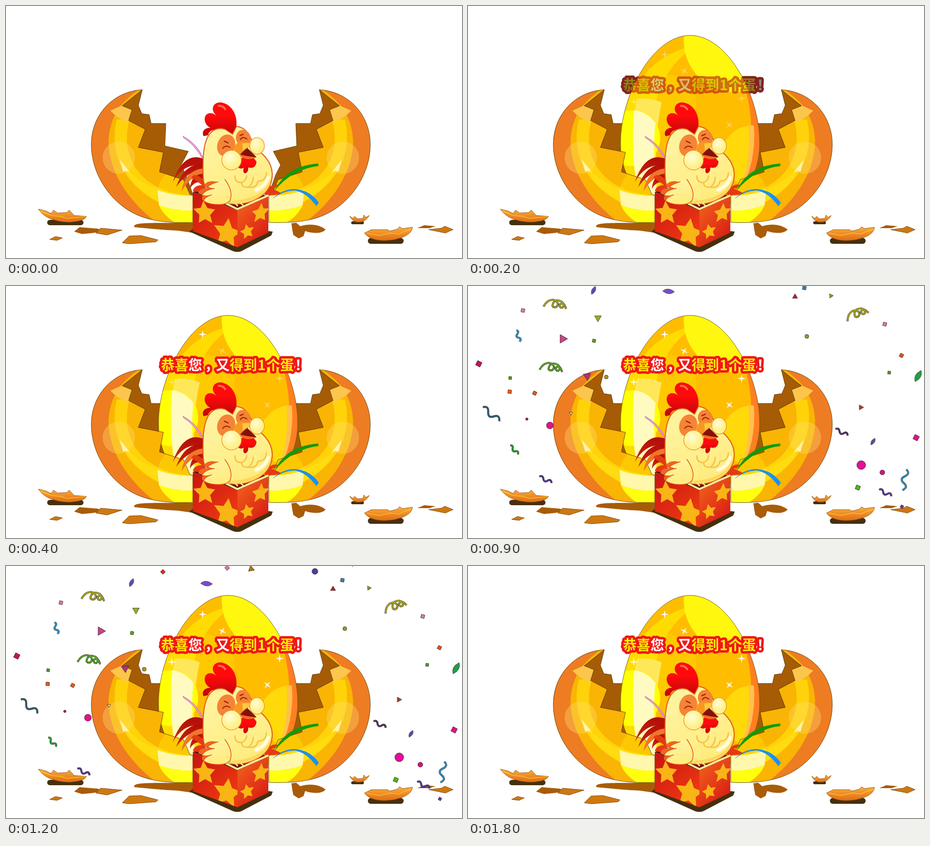
An HTML page that plays this animation: 930 px wide and 515 px high, repeating every 2.1 s.

```html
<!DOCTYPE html>
<html lang="zh">
<head>
<meta charset="utf-8">
<title>恭喜</title>
<style>
html, body { margin: 0; width: 100%; height: 100%; overflow: hidden; background: #fff; }
svg { display: block; width: 930px; height: 515px; }
.matte { filter: brightness(0) invert(.2) sepia(1); }
text { font: bold 28px "Noto Sans CJK SC", "Noto Sans CJK", sans-serif; fill: #fff000;
  stroke: #f01818; stroke-width: 10px; stroke-linejoin: round; paint-order: stroke; }
.w { fill: #fff; }
</style>
</head>
<body>
<svg viewBox="0 0 930 515" fill="none">
<defs>
  <linearGradient id="comb" x2="0" y2="1"><stop offset=".4" stop-color="#ff0a0c"/><stop offset="1" stop-color="#bd0507"/></linearGradient>
  <linearGradient id="body" x2=".4" y2="1"><stop offset=".3" stop-color="#fff29c"/><stop offset="1" stop-color="#ffec80"/></linearGradient>
  <radialGradient id="cheek" cx=".4" cy=".35"><stop offset=".2" stop-color="#fffbc8"/><stop offset="1" stop-color="#fff08c"/></radialGradient>
  <linearGradient id="side" x2=".7" y2="1"><stop stop-color="#c81410"/><stop offset="1" stop-color="#ee3a12"/></linearGradient>
  <linearGradient id="front" x2=".7" y2="1"><stop stop-color="#f4681c"/><stop offset="1" stop-color="#d91c14"/></linearGradient>
  <linearGradient id="chip" x2="0" y2="1"><stop stop-color="#fbae3c"/><stop offset="1" stop-color="#e06c14"/></linearGradient>
  <linearGradient id="tail" x2="0" y2="1"><stop stop-color="#b30d08"/><stop offset="1" stop-color="#c9280e"/></linearGradient>

  <path id="eggShape" d="M453 60C375 60 311 185 311 280C311 365 370 430 453 430C536 430 595 365 595 280C595 185 531 60 453 60Z"/>
  <path id="shellShape" d="M278 171L237 204 257 212 250 234 284 252 270 289 321 299 313 339 362 355 375 385 381 387V442C340 444 300 441 270 428C215 405 174 345 174 283C174 225 215 175 278 171Z"/>
  <path id="sideShape" d="M381 380L472 418V493L381 460Z"/>
  <path id="frontShape" d="M472 418L535 389V463L472 493Z"/>
  <clipPath id="inEgg"><use href="#eggShape"/></clipPath>
  <clipPath id="inShell"><use href="#shellShape"/></clipPath>
  <clipPath id="inSide"><use href="#sideShape"/></clipPath>
  <clipPath id="inFront"><use href="#frontShape"/></clipPath>

  <path id="shellBack" fill="#a65c04" stroke="#4a3000" stroke-width=".8" d="M278 171L270 203 277 220 292 222 296 240 326 240 324 286 372 297 357 325 367 345 381 385 375 390 313 345 270 289 237 204Z"/>
  <g id="shell">
    <g clip-path="url(#inShell)">
      <use href="#shellShape" fill="#f9b404"/>
      <path fill="#ee7c22" d="M290 160C238 188 212 222 209 275C209 340 252 405 318 450H150V150Z"/>
      <path fill="#ffd20a" d="M226 232C208 300 240 395 381 425V388C300 385 226 330 252 232Z"/>
      <path fill="#fcc64c" d="M213 214L237 203 258 212 251 238Q230 232 213 214Z"/>
      <circle cx="230" cy="310" r="33" fill="#ffe070" opacity=".35"/>
      <path fill="#ffdc10" d="M232 314Q270 378 381 388V418Q275 410 232 314Z"/>
      <path fill="#fff3ac" d="M232 314L253 340Q244 335 239 339Z"/>
      <circle cx="366" cy="386" r="58" fill="#ffe600" opacity=".4"/>
      <path fill="#fff7ac" d="M309 376Q340 388 381 388V418Q345 420 312 407Z"/>
      <path fill="#ffff10" d="M312 407Q345 420 381 418V446H350Q322 430 312 407Z"/>
    </g>
    <use href="#shellShape" stroke="#4a3000" stroke-width=".8"/>
  </g>

  <g id="egg">
    <g clip-path="url(#inEgg)">
      <use href="#eggShape" fill="#ffbd00"/>
      <path fill="#ffdc00" d="M470 80C375 112 330 200 345 400H300V260C330 150 390 92 470 80Z"/>
      <path fill="#ffdc00" d="M470 80C375 112 330 200 345 400H400L376 300C368 190 405 112 470 80Z"/>
      <circle cx="580" cy="306" r="62" fill="#ffd90a"/>
      <path fill="#ff7f22" d="M552 125C588 220 592 330 530 420L620 400V125Z"/>
      <path fill="#ffc04c" d="M572 244H583Q589 320 552 388L538 405C568 360 577 300 572 244Z"/>
      <circle cx="545" cy="71" r="105" fill="#fff70e"/>
      <circle cx="406" cy="199" r="59" fill="#ffe000" opacity=".35"/>
      <path fill="#ffe75a" d="M344 190Q370 186 395 197Q375 285 389 400H350Q326 290 344 190Z"/>
      <circle cx="335" cy="270" r="57" fill="#ffff04"/>
      <path fill="#fffbc0" d="M339 213Q364 216 382 239Q376 300 386 400H350Q330 300 339 213Z"/>
    </g>
    <use href="#eggShape" stroke="#5a4000" stroke-width=".8"/>
  </g>

  <text id="words" y="172"><tspan x="316">恭喜</tspan><tspan x="372" class="w">您</tspan><tspan x="405" class="w">，</tspan><tspan x="428" class="w">又</tspan><tspan x="456">得到</tspan><tspan x="513">1</tspan><tspan x="531">个蛋</tspan><tspan x="589" class="w">！</tspan></text>
  <g id="confetti"></g>
  <path id="spark" fill="#fff" d="M0-9L1.4-1.4 9 0 1.4 1.4 0 9-1.4 1.4-9 0-1.4-1.4Z"/>
</defs>

<!-- dark backing that shows through while a layer is half faded -->
<use id="eggBack" class="matte" href="#egg"/>
<use id="wordsBack" class="matte" href="#words"/>
<use id="confettiBack" class="matte" href="#confetti"/>

<g id="debris" fill="#a85c08">
  <path d="M262 452C255 441 305 444 345 443H381L385 464 350 459 330 458 305 456Z"/>
  <path d="M582 444L592 443 600 450Q632 441 652 457Q640 469 610 460L607 470 597 475 586 468 584 458Z"/>
  <path d="M139 461L150 452 187 455 200 460 176 464 155 466Z"/>
  <path d="M839 454L853 448 876 450 864 454Z"/>
  <g fill="#d07810" stroke="#6b3c06" stroke-width=".8">
    <path d="M183 464L193 454 237 458 206 468Z"/>
    <path d="M89 477L101 471 115 474 104 479Z"/>
    <path d="M237 484L251 470 275 469 310 478 306 482 252 486Z"/>
    <path d="M862 457L888 454 895 450 912 457 896 464Z"/>
  </g>
  <g fill="#46300f">
    <rect x="84" y="437" width="74" height="11" rx="6"/>
    <rect x="704" y="440" width="26" height="6" rx="3"/>
    <rect x="738" y="474" width="73" height="12" rx="6"/>
  </g>
  <g fill="url(#chip)" stroke="#8a4a08" stroke-width=".8">
    <path d="M66 415L82 419 92 424 97 417 105 423 124 422 129 417 139 428 164 430Q160 440 128 442Q82 440 66 415Z"/>
    <path d="M701 429L707 434 711 430 717 435 728 434 730 427 734 432 741 428Q733 442 718 442Q706 441 701 429Z"/>
    <path d="M731 464L745 457 778 457 783 460 798 456 803 451 808 455 829 452Q828 470 790 478Q746 484 731 464Z"/>
  </g>
  <path fill="none" stroke="#ffd51c" stroke-width="1.2" d="M70 419L92 428 112 430 125 434 162 430M735 464L760 469 785 464 800 466 826 456"/>
</g>

<use href="#shellBack"/>
<use href="#shellBack" transform="matrix(-1 0 0 1 917 0)"/>
<use id="eggTop" href="#egg"/>
<use href="#shell"/>
<use href="#shell" transform="matrix(-1 0 0 1 917 0)"/>

<path fill="#46300f" d="M374 461L381 455 472 488 535 460 544 461 541 469 480 501Q472 504 463 501Z"/>
<path fill="#5b1208" d="M381 380L440 362 535 389 472 418Z"/>

<g id="ribbons">
  <path fill="#f29ad8" stroke="#a04a88" stroke-width=".7" d="M361 266Q391 282 404 314L401 313Q386 285 362 269Z"/>
  <path fill="#0c9c08" d="M547 378Q572 326 637 322V327Q584 333 547 378Z"/>
  <path fill="#1c90ea" d="M543 395Q561 375 588 374Q620 376 638 402L633 409Q612 380 588 377Q563 378 543 395Z"/>
</g>

<g id="rooster" stroke-linecap="round" stroke-linejoin="round">
  <g fill="url(#tail)">
    <path d="M402 312Q362 297 340 360Q364 318 402 328Z"/>
    <path d="M402 322Q362 323 347 370Q370 336 402 337Z"/>
    <path fill="#f0762a" d="M402 332Q364 336 358 379Q376 347 402 346Z"/>
    <path d="M402 343Q378 343 375 373Q386 355 403 362Z"/>
  </g>
  <path fill="#e43a14" d="M404 356Q385 338 378 351Q390 358 400 366Q384 366 381 378Q394 382 410 380Z"/>
  <path fill="#e43a14" d="M527 386Q536 362 554 365Q550 374 541 373Q556 379 562 383Q548 388 527 386Z"/>
  <path fill="url(#comb)" d="M403 266C398 255 407 248 417 249C400 240 403 219 416 219C423 219 426 222 429 224C414 209 425 196 438 197C460 200 472 222 470 244Q470 257 461 262L430 252Q414 253 412 264Z"/>
  <path stroke="#ff6a50" stroke-width="4" d="M434 204Q443 204 447 211"/>
  <path fill="url(#body)" stroke="#e2571a" stroke-width="2" d="M402 344C400 290 407 257 431 251Q440 249 447 252L462 262 470 246C490 248 500 266 505 288C520 299 542 315 543 343C544 379 511 404 470 405C430 405 402 390 402 344Z"/>
  <path fill="#ffd95c" d="M541 345C536 382 495 399 443 399Q470 407 505 396Q542 381 541 345Z"/>
  <g fill="#f48436">
    <ellipse cx="449" cy="285" rx="18" ry="23" transform="rotate(18 449 285)"/>
    <ellipse cx="484" cy="270" rx="15" ry="17" transform="rotate(-15 484 270)"/>
  </g>
  <path stroke="#9a1c08" stroke-width="2" d="M442 291Q448 283 457 289M445 276L453 280M478 273Q483 265 491 272M477 265L484 262"/>
  <path stroke="#f4c044" stroke-width="2.5" d="M467 347Q466 361 481 361Q480 372 495 370Q511 373 514 358Q530 358 531 341M480 361Q490 357 491 347M496 369Q505 360 504 350"/>
  <path stroke="#fffbe0" stroke-width="7" d="M510 376Q528 369 535 351"/>
  <path fill="url(#comb)" d="M482 310Q467 319 475 331Q481 334 485 330Q482 341 488 342Q495 339 494 330Q509 334 511 318L503 308Z"/>
  <path fill="#85100a" d="M474 302L491 289 511 309 492 310Z"/>
  <path fill="#f06a22" d="M476 303Q494 308 511 309Q494 317 481 309Z"/>
  <path fill="#f79822" d="M464 291Q470 276 481 278Q495 277 510 284Q495 284 478 303Q469 302 464 291Z"/>
  <path fill="#ffc840" d="M482 281Q499 278 508 284Q494 285 483 296Z"/>
  <g fill="url(#cheek)" stroke="#eb8a25" stroke-width="1.2">
    <circle cx="460" cy="315" r="20"/>
    <ellipse cx="512" cy="286" rx="15" ry="17"/>
  </g>
</g>

<g id="box">
  <use href="#sideShape" fill="url(#side)"/>
  <use href="#frontShape" fill="url(#front)"/>
  <path stroke="#fff0a0" stroke-width="4" d="M441 400L472 415 535 387"/>
  <path stroke="#ffe080" stroke-width="3" d="M466 402L473 409M478 402L484 408"/>
  <g id="sideStars" clip-path="url(#inSide)" fill="#f9b416"/>
  <g id="frontStars" clip-path="url(#inFront)" fill="#f9b416"/>
</g>
<g id="wing" stroke-linejoin="round">
  <path fill="#ee6624" d="M433 360Q412 354 404 366L410 373Q395 370 392 383L405 388Q397 388 401 397L425 402Z"/>
  <path fill="url(#body)" stroke="#e2571a" stroke-width="1.5" d="M433 359Q416 364 411 370Q420 374 425 373Q404 376 400 387Q410 390 419 386Q404 391 403 398C415 407 449 410 457 397Q464 378 446 354"/>
</g>

<g id="sparks"></g>
<use id="wordsTop" href="#words"/>
<use id="confettiTop" href="#confetti"/>
</svg>

<script>
const LOOP = 2100;
const $ = id => document.getElementById(id);

function add(parent, tag, attrs) {
  const el = document.createElementNS('http://www.w3.org/2000/svg', tag);
  for (const k in attrs) el.setAttribute(k, attrs[k]);
  return parent.appendChild(el);
}

// steps: [[ms, style], ...], each held until the next
function hold(el, steps) {
  const frames = steps.map(([ms, style]) => ({ ...style, offset: ms / LOOP, easing: 'step-end' }));
  frames.push({ ...steps.at(-1)[1], offset: 1 });
  el.animate(frames, { duration: LOOP, iterations: Infinity });
}
const fade = (el, ...steps) => hold(el, steps.map(([ms, opacity]) => [ms, { opacity }]));

function polygon(n, radius, turn = 0) {
  return Array.from({ length: n }, (_, i) => {
    const a = (turn - 90 + i * 360 / n) * Math.PI / 180, r = radius(i);
    return (r * Math.cos(a)).toFixed(1) + ',' + (r * Math.sin(a)).toFixed(1);
  }).join(' ');
}

function boxStar(parent, x, y, r, skew, turn) {
  add(parent, 'polygon', {
    points: polygon(10, i => i % 2 ? r * .5 : r, turn),
    transform: `translate(${x} ${y}) skewY(${skew}) scale(.94 1)`
  });
}
boxStar($('sideStars'), 405, 423, 25, 8, -6);
boxStar($('sideStars'), 451, 464, 31, 8, 6);
boxStar($('frontStars'), 519, 423, 20, -16, 6);
boxStar($('frontStars'), 492, 461, 16, -8, -10);

// x, y, turn, time of lighting up
[[401, 99, 0, 400], [441, 133, 30, 600], [338, 196, 0, 600], [558, 189, 0, 900], [533, 243, 40, 900]]
  .forEach(([x, y, turn, lit]) => {
    const s = add($('sparks'), 'use', { href: '#spark', transform: `translate(${x} ${y}) rotate(${turn})` });
    fade(s, [0, 0], [200, .35], [lit, 1]);
  });

const confetti = $('confetti');
const overShell = (x, y) => x > 200 && x < 300 && y > 200 && y < 300;
function piece(x, y, turn = 0) {
  const g = add(confetti, 'g', { transform: `translate(${x} ${y}) rotate(${turn})`, stroke: '#2a2416', 'stroke-width': .8 });
  if (overShell(x, y)) fade(g, [0, 1], [1500, .4]);
  return g;
}

// dots: x, y, radius, colour
[[630, 11, 6, '#4c3ca0'], [691, 128, 4, '#9a9a20'], [282, 211, 4, '#a89a20'], [167, 310, 7, '#e6108c'],
 [120, 297, 2.5, '#c01060'], [802, 391, 9, '#e0109a'], [845, 406, 5, '#d81084'], [566, -10, 4, '#8a6a10']]
  .forEach(([x, y, r, fill]) => add(piece(x, y), 'circle', { r, fill }));

// scraps: x, y, radius, turn, colour
const scraps = (shape, list) => list.forEach(([x, y, r, turn, fill]) =>
  add(piece(x, y, turn), 'path', { d: shape(r), fill }));
const square = r => `M${polygon(4, () => r, 52)}Z`;
const wedge = r => `M${polygon(3, () => r)}Z`;
const leaf = r => `M${-r} 0Q${-r * .2} ${-r * .8} ${r} 0Q${r * .2} ${r * .8} ${-r} 0Z`;

scraps(square, [
  [320, 12, 5, 40, '#e03020'], [451, 4, 5, 45, '#f070b0'], [112, 75, 5, 5, '#f070b0'], [257, 137, 4.5, 8, '#58a818'],
  [686, 29, 5, 5, '#2a84cc'], [850, 103, 5, 8, '#f070b0'], [884, 167, 5, 20, '#f05010'], [859, 202, 4, 0, '#50a020'],
  [22, 184, 7, 20, '#c81060'], [86, 213, 4, 0, '#50a020'], [85, 241, 5, 0, '#f05a10'], [136, 244, 5, 20, '#f05a10'],
  [914, 335, 7, 20, '#e0108c'], [795, 437, 6, 15, '#50b820'], [885, 476, 4, 25, '#6a38b0']
]);
scraps(wedge, [
  [500, 6, 7, -10, '#b07a10'], [710, -6, 8, -30, '#c84a20'], [265, 90, 8, 180, '#98b020'], [193, 133, 10, -30, '#d04090'],
  [667, 47, 6, 0, '#c01838'], [740, 45, 5, -35, '#9a9a20'], [243, 209, 9, 175, '#b03080'], [801, 273, 6, -30, '#b04020'],
  [210, 285, 4, 180, '#ffd890']
]);
scraps(leaf, [
  [409, 36, 12, 3, '#7a4cd0'], [826, 343, 8, -60, '#6048b0'], [256, 34, 9, -65, '#6048c0'], [918, 209, 13, -62, '#20a048']
]);

function ribbon(x, y, turn, d, color) {
  const g = piece(x, y, turn);
  add(g, 'path', { d, 'stroke-width': 4 });
  add(g, 'path', { d, 'stroke-width': 2.6, stroke: color });
}
const wave = l => `M${-l / 2}-1Q${-l / 3} ${-l / 4} ${-l / 6} 0T${l / 6} 0T${l / 2} 1`;
[[102, 127, 70, 24, '#2a98d8'], [47, 287, 38, 44, '#2f6478'], [94, 360, 45, 24, '#28a838'], [158, 421, 24, 28, '#50308a'],
 [762, 324, 24, 28, '#4a2c6c'], [851, 448, 24, 28, '#5c38a8'], [890, 421, 98, 43, '#2a98d8']]
  .forEach(([x, y, turn, len, color]) => ribbon(x, y, turn, wave(len), color));

const curl = 'M-23 5C-14-12 2-12 6-2C8 9-8 9-4 0C-1-11 16-9 18 1C18 10 9 9 10 1Q18-7 23 10';
ribbon(177, 62, 0, curl, '#a8a820');
ribbon(169, 191, 0, curl, '#58a828');
ribbon(792, 82, -28, curl, '#a8a820');

fade($('eggBack'), [0, 0], [100, 1], [200, 0]);
fade($('eggTop'), [0, 0], [100, .5], [200, 1]);
fade($('wordsBack'), [0, 0], [200, 1], [400, 0]);
hold($('wordsTop'), [
  [0, { opacity: 0, filter: 'brightness(1)' }],
  [200, { opacity: .6, filter: 'brightness(.75)' }],
  [400, { opacity: 1, filter: 'brightness(1)' }]
]);

const at = (y, opacity) => ({ opacity, transform: `translateY(${y}px)` });
hold($('confettiBack'), [[0, at(0, 0)], [1500, at(25, 1)], [1800, at(25, 0)]]);
hold($('confettiTop'), [[0, at(-25, 0)], [900, at(-25, 1)], [1200, at(0, 1)], [1500, at(25, .4)], [1800, at(25, 0)]]);
</script>
</body>
</html>
```
